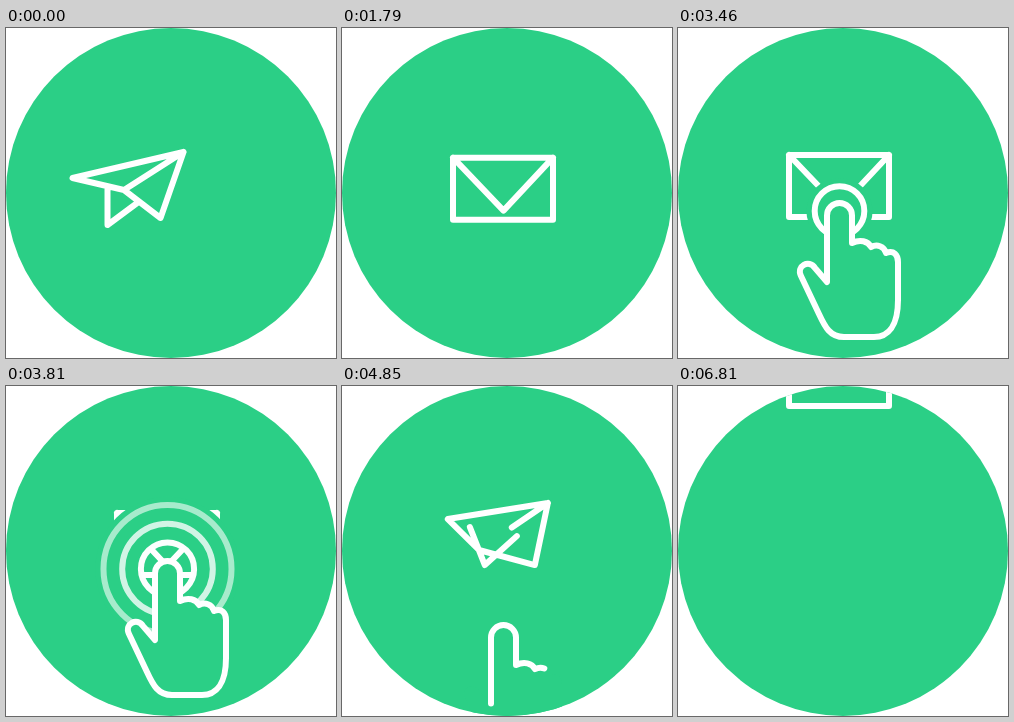
Animation of 330x330 px, one loop 6.91 s. Source, as an HTML page:

```html
<!DOCTYPE html>
<html lang="en">
<head>
<meta charset="utf-8">
<title>Send message</title>
<style>
  html, body { margin: 0; width: 100%; height: 100%; overflow: hidden; background: #fff; }
  svg { display: block; width: 100vw; height: 100vh; }
  .line { fill: none; stroke: #fff; stroke-width: 6; stroke-linecap: round; stroke-linejoin: round; }
  .disc { fill: #2bcf86; }
</style>
</head>
<body>
<svg viewBox="0 0 330 330">
  <defs>
    <clipPath id="stage"><circle cx="165" cy="165" r="165"/></clipPath>
    <clipPath id="reveal"><circle id="revealDisc" cx="161.5" cy="183"/></clipPath>
  </defs>
  <circle class="disc" cx="165" cy="165" r="165"/>
  <g clip-path="url(#stage)">
    <path id="envelope" class="line"/>
    <circle id="wipe" class="disc" cx="161.5" cy="183"/>
    <g id="paperClip"><path id="paper" class="line"/></g>
    <g id="rings"></g>
    <path id="hand" class="line" pathLength="100" style="fill:#2bcf86"
      d="M190 309H166C152 309 147 299 141 286L123 248C118 238 131 231 137 240L149 254V187.5A12.5 12.5 0 0 1 174 187.5V215C182 211 190 213 193 219C199 216 206 218 208 225C216 222 220 227 220 234V272C220 298 210 309 196 309Z"/>
  </g>
</svg>
<script>
const LOOP = 6910, DROP = 1340, TAIL = 6810;
const $ = id => document.getElementById(id);
const clamp = (v, lo = 0, hi = 1) => Math.min(hi, Math.max(lo, v));
const span = (t, from, to) => clamp((t - from) / (to - from));
const lerp = (a, b, k) => a + (b - a) * k;
const easeOut = k => 1 - (1 - k) ** 3;
const show = (el, on) => el.setAttribute('display', on ? 'inline' : 'none');

// Each point: envelope position, half folded position, plane position
const POINTS = {
  tail:  [[111, 127], [106, 133], [66.5, 150]],
  nose:  [[211, 127], [206, 117], [177.5, 124]],
  wing:  [[211, 189], [193, 179], [154.5, 190]],
  keel:  [[111, 189], [137, 164], [118, 162]],
  foldA: [[111, 127], [128, 141], [101.5, 161]],
  foldB: [[161, 180], [143, 179], [101.5, 197]],
  foldC: [[211, 127], [175, 150], [132.5, 174]]
};

const rings = [0, 1, 2].map(() => {
  const ring = document.createElementNS('http://www.w3.org/2000/svg', 'circle');
  ring.setAttribute('class', 'line');
  ring.setAttribute('cx', 161.5);
  ring.setAttribute('cy', 183);
  return $('rings').appendChild(ring);
});
const ringRadius = (t, i) => 25 + 0.112 * (t - 3460 - 167 * i);

function drawEnvelope(t) {
  const s = t - DROP;
  const visible = s >= 0 && t < 4150;
  show($('envelope'), visible);
  if (!visible) return;
  const y = -169 * Math.exp(-0.009 * s) * Math.cos(0.006 * s);
  const tip = 127 + 53 * easeOut(span(s, 0, 400));
  $('envelope').setAttribute('d', `M111 127H211V189H111ZL161.5 ${tip}L211 127`);
  $('envelope').setAttribute('transform', `translate(0 ${y})`);
}

function drawPaper(t) {
  const radius = ringRadius(t, 2);
  const visible = radius > 8 && t < 6010;
  show($('paper'), visible);
  if (!visible) return;
  $('revealDisc').setAttribute('r', radius);
  if (t < 4400) $('paperClip').setAttribute('clip-path', 'url(#reveal)');
  else $('paperClip').removeAttribute('clip-path');

  const first = span(t, 4250, 4850) ** 2;
  const second = span(t, 4850, 5520);
  const lift = -10 * Math.sin(Math.PI * easeOut(second));
  const p = {};
  for (const name in POINTS) {
    const [a, b, c] = POINTS[name];
    p[name] = [0, 1].map(i => lerp(lerp(a[i], b[i], first), c[i], easeOut(second)));
  }
  p.nose[1] += lift * 0.6;
  const crease = span(t, 4490, 5180);
  const creaseEnd = [0, 1].map(i => lerp(p.nose[i], p.keel[i], crease));
  let d = `M${p.tail}L${p.nose}L${p.wing}L${p.keel}ZM${p.foldA}L${p.foldB}L${p.foldC}`;
  if (crease > 0) d += `M${p.nose}L${creaseEnd}`;
  $('paper').setAttribute('d', d);

  const x = 290 * span(t, 5580, 6000) ** 2;
  $('paper').setAttribute('transform', `translate(${x} ${-0.35 * x})`);
}

function drawRings(t) {
  rings.forEach((ring, i) => {
    const r = ringRadius(t, i);
    const opacity = clamp((r - 12) / 8) * clamp(1 - (r - 25) / 95);
    show(ring, opacity > 0 && r < 113);
    ring.setAttribute('r', Math.max(0, r - 0.3));
    ring.setAttribute('stroke-opacity', opacity);
  });
  const lead = ringRadius(t, 0);
  show($('wipe'), lead > 12 && t < 4500);
  $('wipe').setAttribute('r', Math.max(0, lead + 8));
}

function drawHand(t) {
  const grow = span(t, 2100, 2950);
  const leave = Math.max(0, (t - 4150) / 700);
  const start = 52 * (1 - grow) + 34 * leave;
  const end = 52 + 48 * grow - 28 * leave;
  const y = 150 * (1 - easeOut(span(t, 2030, 2750))) + 64 * leave;
  const visible = t > 2040 && end > start;
  show($('hand'), visible);
  if (!visible) return;
  const full = end - start >= 100;
  $('hand').setAttribute('stroke-dasharray', full ? 'none' : `${end - start} 200`);
  $('hand').setAttribute('stroke-dashoffset', -start);
  $('hand').setAttribute('transform', `translate(0 ${y})`);
}

function render(ms) {
  const time = ms % LOOP;
  // The loop opens on the plane's departure and closes on the envelope's entry
  const t = time >= TAIL ? DROP : time < DROP ? time + TAIL - DROP : time;
  drawEnvelope(t);
  drawPaper(t);
  drawRings(t);
  drawHand(t);
}

const began = performance.now();
function tick() {
  render(performance.now() - began);
  requestAnimationFrame(tick);
}
tick();
</script>
</body>
</html>
```
